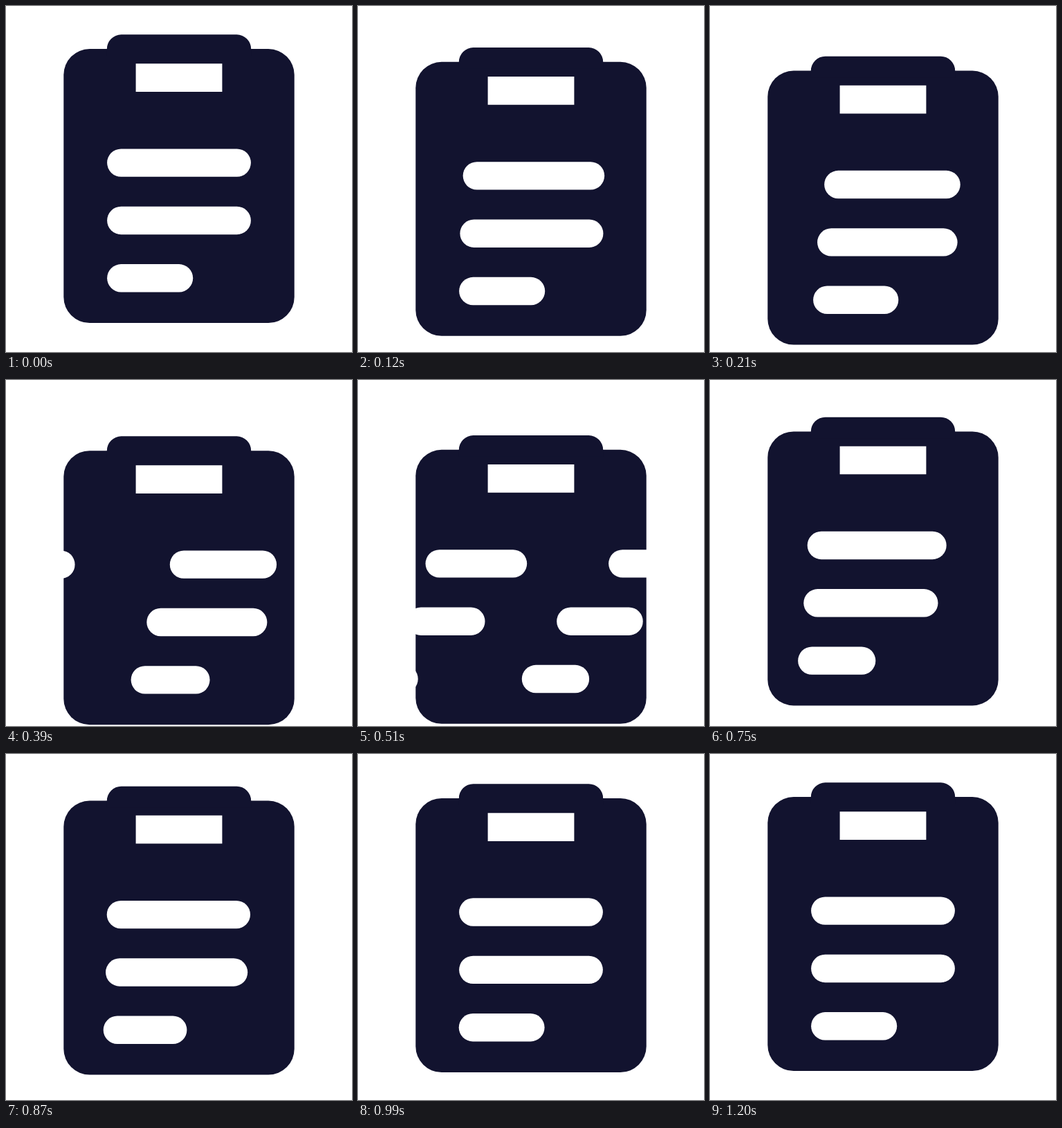
Animation of 500x500 px, one loop 3730 ms. Source, as an HTML page:

```html
<!DOCTYPE html>
<html lang="en">
<head>
<meta charset="utf-8">
<title>Clipboard</title>
<style>
  html, body { margin: 0; width: 100%; height: 100%; overflow: hidden; background: #fff; }
  svg { display: block; width: 100%; height: 100%; }
</style>
</head>
<body>
<svg viewBox="0 0 500 500">
  <g id="board">
    <g fill="#12132f">
      <rect x="83.3" y="62.1" width="333.4" height="396" rx="37.5"/>
      <path d="M145.8 62.2a20.8 20.8 0 0 1 20.8-20.9H333.4a20.8 20.8 0 0 1 20.8 20.9V72H145.8z"/>
    </g>
    <path d="M187.6 83.3H312.4V124H187.6z" fill="#fff"/>
    <g id="bars" stroke="#fff" stroke-width="40.4" stroke-linecap="round"></g>
  </g>
</svg>
<script>
const LOOP = 3730, STEP = 30, ACTIVE = 1200;
const LEFT = 166.3, EXIT = 450, ENTRY = 33.3;
const SLIDE = 600, ARRIVE = 918, STAGGER = 60;
const DROP = 40.6, BOTTOM_AT = 465;

const board = document.getElementById('board');
const group = document.getElementById('bars');

const clamp = v => Math.min(1, Math.max(0, v));
const mix = (a, b, p) => a + (b - a) * p;

// Cubic Bezier easing, solved by bisection
function bezier(x1, y1, x2, y2) {
  const at = (a, b, s) => 3 * a * s * (1 - s) ** 2 + 3 * b * s * s * (1 - s) + s ** 3;
  return v => {
    const x = clamp(v);
    if (x === 0 || x === 1) return x;
    let lo = 0, hi = 1;
    for (let i = 0; i < 24; i++) {
      const mid = (lo + hi) / 2;
      if (at(x1, x2, mid) < x) lo = mid; else hi = mid;
    }
    return at(y1, y2, lo);
  };
}

const settle = bezier(.25, .1, .2, 1);
const launch = bezier(.88, 0, .79, 1);

function addLine(y) {
  const line = document.createElementNS('http://www.w3.org/2000/svg', 'line');
  line.setAttribute('y1', y);
  line.setAttribute('y2', y);
  return group.appendChild(line);
}

const bars = [333.7, 333.7, 250].map((right, i) => {
  const y = 226.6 + i * 83.35;
  return { right, delay: i * STAGGER, leaving: addLine(y), entering: addLine(y) };
});

// Each bar shrinks to a point beyond one side and grows from a point beyond the other
function place(line, right, point, p) {
  line.setAttribute('x1', mix(LEFT, point, p));
  line.setAttribute('x2', mix(right, point, p));
}

function draw(now) {
  const t = Math.min(ACTIVE, Math.floor(now % LOOP / STEP) * STEP);
  const depth = t < BOTTOM_AT
    ? settle(t / BOTTOM_AT)
    : 1 - settle((t - BOTTOM_AT) / (ACTIVE - BOTTOM_AT));
  board.setAttribute('transform', `translate(0 ${DROP * depth})`);

  for (const { right, delay, leaving, entering } of bars) {
    const local = t - delay;
    place(leaving, right, EXIT, launch(local / SLIDE));
    place(entering, right, ENTRY, launch((ARRIVE - local) / SLIDE));
  }
  requestAnimationFrame(draw);
}

draw(0);
</script>
</body>
</html>
```
